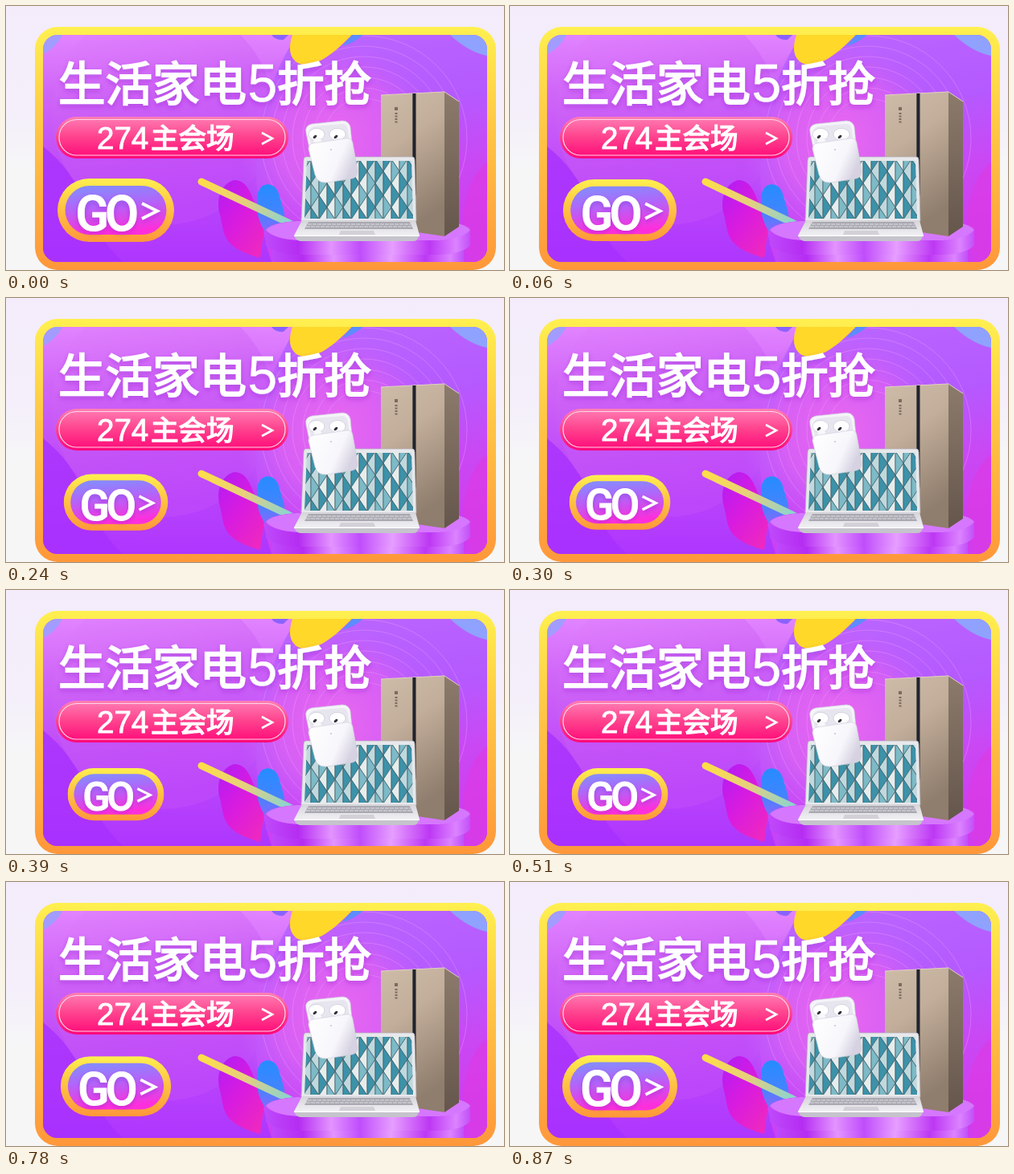
An HTML page that plays this animation: 619 px wide and 329 px high, repeating every 900 ms.

```html
<!DOCTYPE html>
<html lang="zh-CN">
<head>
<meta charset="utf-8">
<style>
html, body { margin: 0; width: 100%; height: 100%; overflow: hidden; background: #f5f3f8; }
svg { display: block; width: 619px; height: 329px; }
text { fill: #fff; stroke: #fff; }
.cjk { font-family: "Noto Sans CJK SC", "Noto Sans CJK", sans-serif; }
.num { font-family: "Liberation Sans", Arial, sans-serif; }
.go { font-family: Roboto, sans-serif; font-weight: 500; }
#button { transform-origin: 136.5px 255px; }
</style>
</head>
<body>
<svg viewBox="0 0 619 329">
  <defs>
    <linearGradient id="page" x2="0" y2="1"><stop stop-color="#f4ecfb"/><stop offset=".4" stop-color="#f4effa"/><stop offset=".62" stop-color="#f6f6f7"/></linearGradient>
    <linearGradient id="rim" x2="0" y2="1"><stop stop-color="#fff04f"/><stop offset=".4" stop-color="#ffc845"/><stop offset="1" stop-color="#ff973a"/></linearGradient>
    <linearGradient id="base" x2="0" y2="1"><stop stop-color="#e184ff"/><stop offset=".25" stop-color="#d066f8"/><stop offset=".55" stop-color="#c04ef8"/><stop offset="1" stop-color="#ae36ff"/></linearGradient>
    <linearGradient id="disc" x2=".25" y2="1"><stop stop-color="#e88dff"/><stop offset=".5" stop-color="#cb5ff5"/><stop offset="1" stop-color="#c04bfa"/></linearGradient>
    <linearGradient id="right" x2=".25" y2="1"><stop stop-color="#bc68ff"/><stop offset=".45" stop-color="#b45aff"/><stop offset=".75" stop-color="#ca48f4"/><stop offset="1" stop-color="#cf3df0"/></linearGradient>
    <radialGradient id="halo"><stop stop-color="#e968f0"/><stop offset=".6" stop-color="#d65ff5"/><stop offset="1" stop-color="#c05dfd" stop-opacity="0"/></radialGradient>
    <linearGradient id="blob" x2=".8" y2="1"><stop stop-color="#b01df5"/><stop offset=".5" stop-color="#d81be0"/><stop offset="1" stop-color="#ee28c0"/></linearGradient>
    <linearGradient id="blue" x2="0" y2="1"><stop stop-color="#268cff"/><stop offset=".5" stop-color="#4284ff"/><stop offset="1" stop-color="#a35cff"/></linearGradient>
    <linearGradient id="bar" gradientUnits="userSpaceOnUse" x1="240" y1="217" x2="355" y2="271"><stop stop-color="#ffdf45"/><stop offset=".5" stop-color="#e6cf7e"/><stop offset="1" stop-color="#83d5d5"/></linearGradient>
    <linearGradient id="pink" x2="0" y2="1"><stop stop-color="#ff7fb4"/><stop offset=".48" stop-color="#ff438e"/><stop offset="1" stop-color="#ff0878"/></linearGradient>
    <linearGradient id="btn" x2=".2" y2="1"><stop stop-color="#7e92ff"/><stop offset=".45" stop-color="#b066fa"/><stop offset="1" stop-color="#fb30dc"/></linearGradient>
    <linearGradient id="plinth"><stop stop-color="#bf49fb"/><stop offset=".16" stop-color="#b52df2"/><stop offset=".32" stop-color="#e394ff"/><stop offset=".46" stop-color="#c04dfb"/><stop offset=".62" stop-color="#e69eff"/><stop offset=".8" stop-color="#bd38f4"/><stop offset=".93" stop-color="#dc83ff"/><stop offset="1" stop-color="#c150f8"/></linearGradient>
    <linearGradient id="door" x2=".3" y2="1"><stop stop-color="#cebca8"/><stop offset=".4" stop-color="#c2ae9a"/><stop offset="1" stop-color="#8f7d6d"/></linearGradient>
    <linearGradient id="side" x2="0" y2="1"><stop stop-color="#8c7b6b"/><stop offset="1" stop-color="#65564c"/></linearGradient>
    <linearGradient id="pod" x2="1" y2=".4"><stop stop-color="#fff"/><stop offset=".7" stop-color="#f7f6fb"/><stop offset="1" stop-color="#d6d2e2"/></linearGradient>
    <linearGradient id="metal" x2="0" y2="1"><stop stop-color="#d5d5da"/><stop offset="1" stop-color="#f1f0f4"/></linearGradient>
    <clipPath id="card"><rect x="46" y="36" width="552" height="283" rx="18"/></clipPath>
    <clipPath id="screen"><path d="M374 193H504L506 265H371Z"/></clipPath>
    <filter id="glow" x="-10%" y="-30%" width="120%" height="170%"><feDropShadow dx="0" dy="3" stdDeviation="3" flood-color="#8414c4" flood-opacity=".35"/></filter>
  </defs>

  <rect width="619" height="329" fill="url(#page)"/>
  <rect x="36" y="26" width="573" height="303" rx="28" fill="url(#rim)"/>

  <g clip-path="url(#card)">
    <rect x="46" y="36" width="552" height="283" fill="url(#base)"/>
    <path d="M46 175Q84 205 100 249T146 319H46Z" fill="#a72fff" opacity=".75"/>
    <circle cx="195" cy="135" r="138" fill="url(#disc)" opacity=".6"/>
    <path d="M362 36H598V319H330Q280 160 362 36Z" fill="url(#right)"/>
    <circle cx="410" cy="165" r="125" fill="url(#halo)"/>
    <g id="rings" fill="none" stroke="#ef9cff" stroke-opacity=".4"/>
    <path d="M46 36H70Q62 52 46 60Z" fill="#a29cff"/>
    <path d="M552 36H598V62Q574 57 552 36Z" fill="#8fa2ff"/>
    <path d="M598 195Q566 220 568 285L577 319H598Z" fill="#dc3be4" opacity=".7"/>
    <path d="M284 217C268 220 260 242 266 260C272 283 266 300 316 314L322 270C306 250 306 217 284 217Z" fill="url(#blob)"/>
    <path d="M312 250V239C313 218 334 217 339 234L346 258V292H330Q312 272 312 250Z" fill="url(#blue)"/>
    <path d="M243 219L353 271" stroke="url(#bar)" stroke-width="9" stroke-linecap="round"/>
    <path d="M356 36H430Q421 45 411 54Q379 81 361 70Q348 60 356 36Z" fill="#ffd829"/>
    <path d="M430 36H444Q432 46 418 50Z" fill="#5c8cff"/>
    <path d="M330 36H351L345 42Q335 43 330 36Z" fill="#8a62ff"/>
    <path d="M331 297H569V319H331Z" fill="url(#plinth)"/>
    <path d="M323 279Q330 270 362 268H538Q570 270 577 279V298Q568 309 538 310H362Q332 309 323 298Z" fill="url(#plinth)"/>
    <path d="M323 279Q330 270 362 268H538Q570 270 577 279Q568 290 538 292H362Q332 290 323 279Z" fill="#d677ff"/>
  </g>

  <path d="M466 111L545 107V287L466 275Z" fill="url(#door)"/>
  <path d="M545 107L563 119V275L545 287Z" fill="url(#side)"/>
  <path d="M466 111L545 107L563 119" fill="none" stroke="#e0d0be"/>
  <path d="M506 109V282" stroke="#6d5d50"/>
  <path d="M507.5 109V236" stroke="#20242e" stroke-width="4"/>
  <rect x="483" y="126" width="4" height="4" fill="#7b6c60"/>
  <path d="M485 133V147" stroke="#7b6c60" stroke-width="3" stroke-dasharray="2 1.5"/>

  <path d="M373 188H505Q508 188 508 192L510 268H367L370 192Q370 188 373 188Z" fill="#e7e8eb" stroke="#b2aeb8" stroke-width=".7"/>
  <g id="gems" clip-path="url(#screen)" stroke="#3b5963" stroke-width=".7"/>
  <path d="M368 267H509L514 286H358Z" fill="url(#metal)"/>
  <path d="M376 269H502L506 278H371Z" fill="#aaa8b0"/>
  <path d="M375 272H503M373 275H505" stroke="#eeedf1" stroke-width=".8" stroke-dasharray="5 1"/>
  <path d="M416 280H457L459 285H414Z" fill="#d3d1d7"/>
  <path d="M358 286H514L511 291Q510 293 506 293H366Q361 293 358 286Z" fill="#c5c3cb"/>
  <path d="M358 286.5H514" stroke="#fff"/>

  <path d="M373 158Q371 149 380 147L418 143Q426 143 428 151L430 171L377 177Z" fill="#f5f4f9" stroke="#cfcbdb" stroke-width=".7"/>
  <path d="M377 161Q376 152 383 150L418 147Q424 147 425 155L427 169L379 173Z" fill="#e7e5ee"/>
  <g id="buds"/>
  <path d="M376 178Q376 172 382 171L423 165Q430 164 431 171L437 205Q438 213 430 215L399 220Q387 221 384 210Z" fill="url(#pod)" stroke="#d4d0df" stroke-width=".7"/>
  <circle cx="404" cy="179" r="1" fill="#c5c1cf"/>

  <g filter="url(#glow)">
    <text class="cjk" x="65" y="118" font-size="58.5" stroke-width="2">生活家电</text>
    <text class="num" x="300.5" y="118.5" font-size="66" stroke-width=".4">5</text>
    <text class="cjk" x="337" y="118" font-size="58.5" stroke-width="2">折抢</text>
  </g>

  <rect x="62" y="138" width="289" height="52" rx="26" fill="url(#pink)"/>
  <rect x="66" y="141.5" width="281" height="44.5" rx="22" fill="none" stroke="#ffd6e8" stroke-width="1.2"/>
  <text class="num" x="113" y="178" font-size="38.5" stroke-width=".9">274</text>
  <text class="cjk" x="180" y="177" font-size="34.5" stroke-width="1.5">主会场</text>
  <path d="M318 158L331 165L318 172" fill="none" stroke="#fff" stroke-width="2.6"/>

  <g id="button">
    <rect x="64" y="215" width="145" height="79" rx="39.5" fill="url(#rim)"/>
    <rect x="73.5" y="224" width="126" height="61" rx="30.5" fill="url(#btn)"/>
    <g filter="url(#glow)">
      <text class="go" x="86.5" y="279.5" font-size="61" letter-spacing="-5" stroke="none">GO</text>
      <path d="M169 246L188 255.5L169 265" fill="none" stroke="#fff" stroke-width="3.8"/>
    </g>
  </g>
</svg>
<script>
const get = id => document.getElementById(id);
const add = (id, tag, attrs) => {
  const el = document.createElementNS('http://www.w3.org/2000/svg', tag);
  for (const key in attrs) el.setAttribute(key, attrs[key]);
  get(id).append(el);
};

for (let r = 50; r <= 130; r += 13) add('rings', 'circle', { cx: 445, cy: 165, r });

// Two-tone diamonds on the laptop screen
const W = 10, H = 15;
for (let row = 0; row < 7; row++) {
  for (let col = 0; col < 8; col++) {
    const x = 369 + col * 2 * W + row % 2 * W, y = 176 + row * H;
    const half = (w, fill) => add('gems', 'path', { d: `M${x} ${y}l${w} ${H}l${-w} ${H}Z`, fill });
    half(-W, (row + col) % 2 ? '#c0d9de' : '#e5eded');
    half(W, (row + col) % 3 ? '#3c92a9' : '#7dbac7');
  }
}

for (const x of [386, 412]) {
  add('buds', 'ellipse', { cx: x, cy: 160, rx: 10, ry: 7.5, fill: '#fff', stroke: '#cbc7d7', 'stroke-width': .7 });
  add('buds', 'path', { d: `M${x - 4} 164h9l2 9h-10Z`, fill: '#f8f7fb' });
  add('buds', 'ellipse', { cx: x - 2, cy: 163, rx: 1.6, ry: 2.8, fill: '#34313d', transform: `rotate(50 ${x - 2} 163)` });
}

// Shrinks and grows in 30 ms steps; the tiny lead keeps step edges clear of rounding
const easing = 'steps(15, end)';
get('button').animate([
  { transform: 'scale(1)', easing },
  { transform: 'scale(.8)', easing },
  { transform: 'scale(1)' }
], { duration: 900, delay: -1, iterations: Infinity });
</script>
</body>
</html>
```
